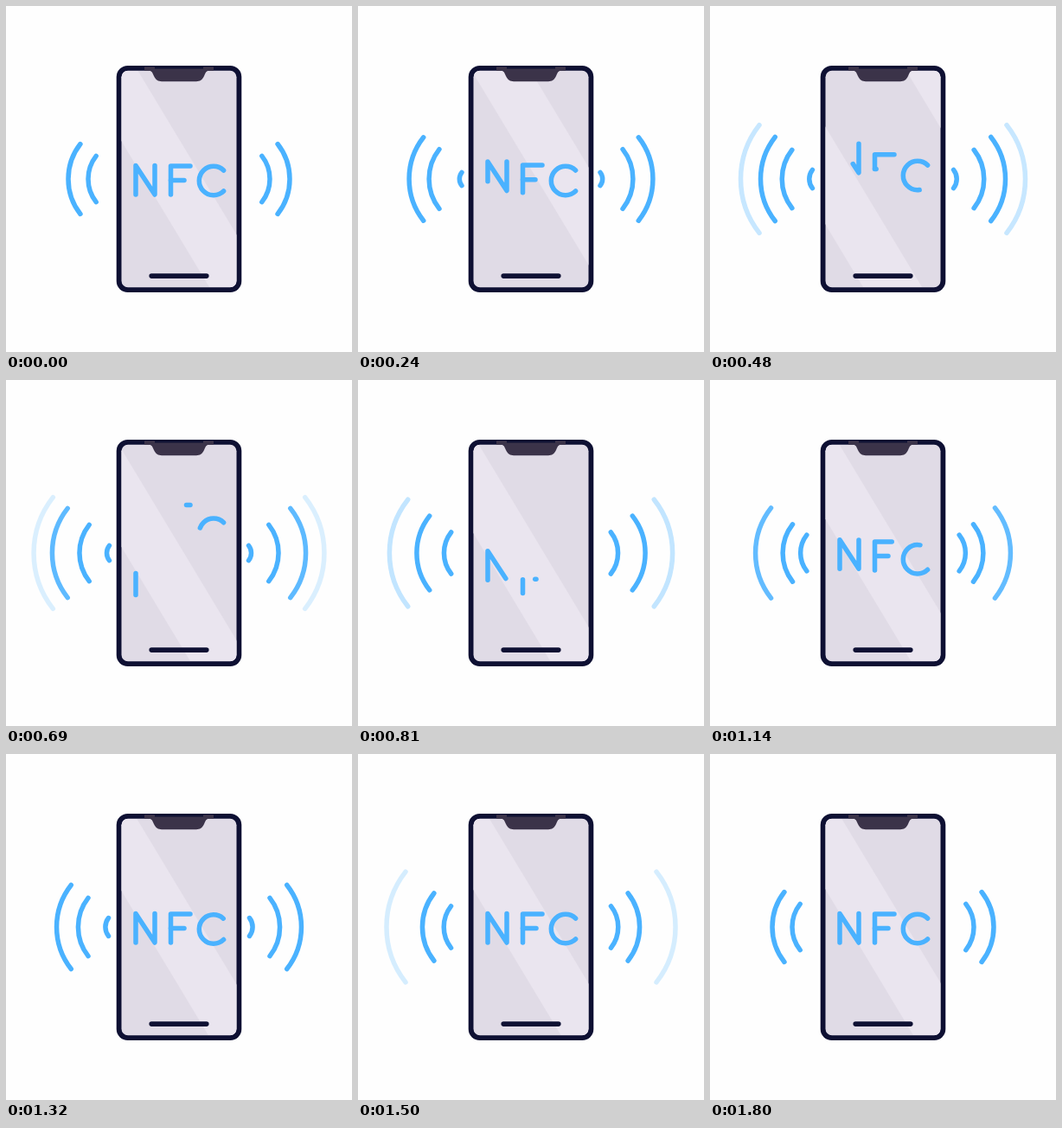
An HTML page with a canvas that plays this animation: 400 by 400 pixels, repeating every 2.83 s.

```html
<!DOCTYPE html>
<html lang="en">
<head>
<meta charset="utf-8">
<title>NFC phone</title>
<style>
html, body { margin: 0; width: 100%; height: 100%; overflow: hidden; background: #fefefe; }
canvas { display: block; width: 100%; height: 100%; }
</style>
</head>
<body>
<canvas id="stage"></canvas>
<script>
const canvas = document.getElementById('stage');
const ctx = canvas.getContext('2d');
const LOOP = 2830, STEP = 30, END = 1800;
const BLUE = '#4ab2ff', NAVY = '#0e1033', NOTCH = '#3b3349';
const SCREEN = '#e0dbe6', SHINE = '#eae5ef';
const LINE = 5.5;

// Waves: left edges at rest, where they are born and where they vanish.
const REST = [72, 95], BIRTH_X = 124, GONE_X = 31;
const WAVE_GAP = 222, WAVE_SPEED = 0.142, TRAVELLERS = 4;
const FIRST_TRAVEL = 193, FIRST_SETTLE = 1040;
const BEND = 0.345;

const clamp = v => Math.max(0, Math.min(1, v));

function polyline(...points) {
  const path = new Path2D();
  let length = 0;
  points.forEach(([x, y], i) => {
    if (!i) return path.moveTo(x, y);
    path.lineTo(x, y);
    length += Math.hypot(x - points[i - 1][0], y - points[i - 1][1]);
  });
  return { path, length };
}

function arcLine(x, y, r, from, to) {
  const path = new Path2D();
  path.arc(x, y, r, from, to);
  return { path, length: r * (to - from) };
}

const rad = deg => deg * Math.PI / 180;
const letterN = polyline([150, 218], [150, 184.5], [172, 218], [172, 184.5]);
const letterF = polyline([190.5, 218], [190.5, 185], [213, 185]);
const crossbar = polyline([206, 201.6], [190.5, 201.6]);
const letterC = arcLine(240, 202, 16.7, rad(46), rad(314));

function strokePart({ path, length }, from, to) {
  const part = (to - from) * length;
  if (part <= 0.05) return;
  ctx.setLineDash([part, 9999]);
  ctx.lineDashOffset = -from * length;
  ctx.stroke(path);
  ctx.setLineDash([]);
}

// A letter is wiped away upwards, then drawn again from below.
function drawLetter(shape, time, bar) {
  const leaving = time < 625;
  const out = clamp(time / 600) ** 2.5;
  const left = clamp((Math.exp(-0.0064 * (time - 650)) - 0.04) / 0.96);
  ctx.save();
  ctx.translate(0, leaving ? -44 * out : 40 * left);
  if (leaving) {
    strokePart(shape, out, 1);
    if (bar) strokePart(bar, clamp(3 * out), 1);
  } else {
    strokePart(shape, 0, 1 - left);
    if (bar) strokePart(bar, 0, (1 - left) ** 2);
  }
  ctx.restore();
}

function drawWave(x) {
  if (x < GONE_X || x >= BIRTH_X) return;
  const h = Math.min(0.6 * (139.4 - x), 1.15 * (BIRTH_X - x)), s = BEND * h;
  const r = (h * h + s * s) / (2 * s), half = 2 * Math.atan(BEND);
  ctx.globalAlpha = clamp((x - 26) / 31);
  for (const side of [-1, 1]) {
    const mid = side < 0 ? Math.PI : 0;
    ctx.beginPath();
    ctx.arc(200 + side * (200 - x - r), 200, r, mid - half, mid + half);
    ctx.stroke();
  }
  ctx.globalAlpha = 1;
}

function drawWaves(t) {
  REST.forEach((rest, i) => {
    drawWave(rest - 36.5 * (t / 480) ** 1.5);
    const born = FIRST_SETTLE + i * WAVE_GAP;
    const p = clamp((t - born) / (END - born));
    drawWave(rest + (BIRTH_X - rest) * (1 - p) ** 3.3);
  });
  for (let i = 0; i < TRAVELLERS; i++) {
    drawWave(BIRTH_X - WAVE_SPEED * (t - FIRST_TRAVEL - i * WAVE_GAP));
  }
}

function fillBox(x, y, w, h, r, color) {
  ctx.fillStyle = color;
  ctx.beginPath();
  ctx.roundRect(x, y, w, h, r);
  ctx.fill();
}

function drawShine(right) {
  const width = 68, run = 250 / 1.66;
  ctx.beginPath();
  ctx.moveTo(right - width, 75);
  ctx.lineTo(right, 75);
  ctx.lineTo(right + run, 325);
  ctx.lineTo(right + run - width, 325);
  ctx.fill();
}

function drawNotch() {
  fillBox(160, 69.3, 80, 5.5, 0, NOTCH);
  ctx.beginPath();
  ctx.moveTo(164, 74.5);
  ctx.bezierCurveTo(169, 74.8, 169, 77, 171, 81);
  ctx.bezierCurveTo(173, 85.5, 176, 87.2, 180, 87.2);
  ctx.lineTo(220, 87.2);
  ctx.bezierCurveTo(224, 87.2, 227, 85.5, 229, 81);
  ctx.bezierCurveTo(231, 77, 231, 74.8, 236, 74.5);
  ctx.fill();
  fillBox(160, 69, 80, 1.2, 0, NAVY);
  fillBox(172, 69, 56, 3.5, 0, NAVY);
}

function drawPhone(t) {
  fillBox(127.7, 69, 144.6, 262, 13, NAVY);
  ctx.save();
  fillBox(133.5, 74.8, 133, 250.4, 7.5, SCREEN);
  ctx.clip();
  ctx.fillStyle = SHINE;
  drawShine(152.5 + 47 * (t / 240) ** 1.6);
  drawShine(152.5 - 58 * Math.exp(-0.0046 * (t - 480)));
  ctx.restore();
  drawNotch();
  fillBox(165.4, 309.3, 69.2, 5.6, 2.8, NAVY);
}

function draw(t) {
  const dpr = window.devicePixelRatio || 1;
  const w = Math.round(innerWidth * dpr), h = Math.round(innerHeight * dpr);
  if (canvas.width !== w || canvas.height !== h) {
    canvas.width = w;
    canvas.height = h;
  }
  const scale = Math.min(w, h) / 400;
  ctx.setTransform(1, 0, 0, 1, 0, 0);
  ctx.fillStyle = '#fefefe';
  ctx.fillRect(0, 0, w, h);
  ctx.setTransform(scale, 0, 0, scale, (w - 400 * scale) / 2, (h - 400 * scale) / 2);
  ctx.lineCap = ctx.lineJoin = 'round';
  ctx.strokeStyle = BLUE;
  ctx.lineWidth = LINE;

  drawWaves(t);
  drawPhone(t);
  drawLetter(letterN, t);
  drawLetter(letterF, t - 110, crossbar);
  drawLetter(letterC, t - 210);
}

const start = performance.now();
function tick() {
  const elapsed = (performance.now() - start) % LOOP;
  draw(Math.min(END, Math.floor(elapsed / STEP) * STEP));
  requestAnimationFrame(tick);
}
tick();
</script>
</body>
</html>
```
